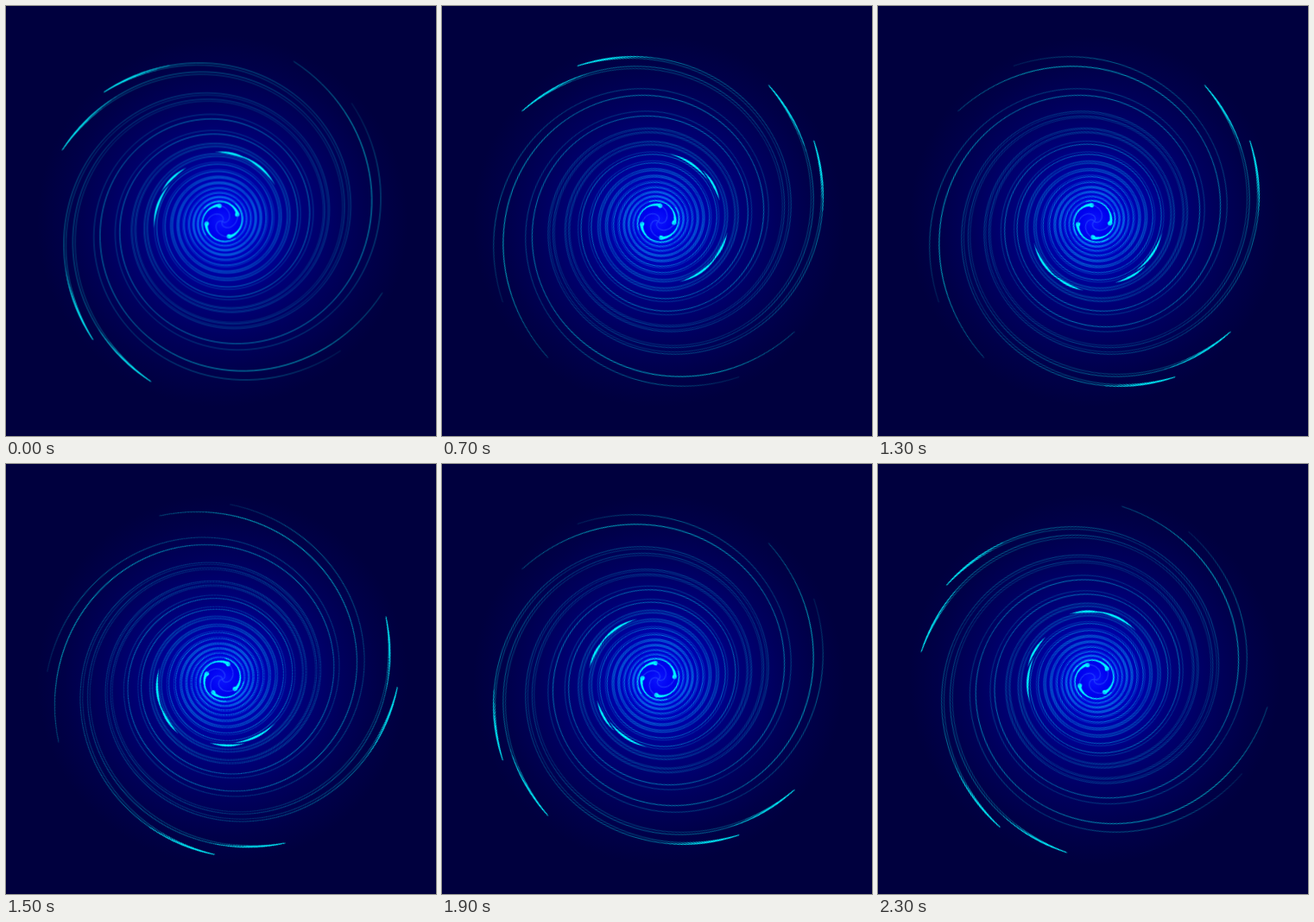
These frames come from a looping animation (498 by 498 pixels, 2.4 s). An HTML page:

```html
<!DOCTYPE html>
<html lang="en">
<head>
<meta charset="utf-8">
<title>Blue spiral</title>
<style>
  html, body { margin: 0; width: 100%; height: 100%; overflow: hidden; background: #00003e; }
  svg { display: block; width: 498px; height: 498px; }
  #spin { animation: spin 2.4s steps(24) infinite; }
  @keyframes spin { to { transform: rotate(360deg); } }
  path { fill: none; }
  .ribbon { fill: #00f6ff; }
</style>
</head>
<body>
<svg viewBox="0 0 498 498">
  <defs>
    <radialGradient id="glow" gradientUnits="userSpaceOnUse" cx="0" cy="0" r="215">
      <stop offset="0" stop-color="#0a14ff"/>
      <stop offset=".08" stop-color="#0000ee"/>
      <stop offset=".17" stop-color="#0000c4"/>
      <stop offset=".3" stop-color="#00009a"/>
      <stop offset=".42" stop-color="#00007a"/>
      <stop offset=".65" stop-color="#00005c"/>
      <stop offset=".85" stop-color="#000048"/>
      <stop offset="1" stop-color="#00003e"/>
    </radialGradient>
    <radialGradient id="bright" gradientUnits="userSpaceOnUse" cx="0" cy="0" r="205">
      <stop offset="0" stop-color="#14a0ff" stop-opacity=".8"/>
      <stop offset=".14" stop-color="#0cb4ff" stop-opacity=".75"/>
      <stop offset=".35" stop-color="#00a4e0" stop-opacity=".55"/>
      <stop offset=".7" stop-color="#00a8c8" stop-opacity=".55"/>
      <stop offset=".88" stop-color="#00c4d0" stop-opacity=".7"/>
      <stop offset="1" stop-color="#00f6ff"/>
    </radialGradient>
    <radialGradient id="fading" gradientUnits="userSpaceOnUse" cx="0" cy="0" r="205">
      <stop offset="0" stop-color="#14a0ff" stop-opacity=".8"/>
      <stop offset=".14" stop-color="#0cb4ff" stop-opacity=".75"/>
      <stop offset=".35" stop-color="#00b0e8" stop-opacity=".6"/>
      <stop offset=".7" stop-color="#00c0d8" stop-opacity=".65"/>
      <stop offset=".92" stop-color="#00e0e4" stop-opacity=".85"/>
      <stop offset="1" stop-color="#00d0d8" stop-opacity=".3"/>
    </radialGradient>
  </defs>
  <g transform="translate(250.5 249.5)">
    <circle r="215" fill="url(#glow)"/>
    <g id="spin"></g>
  </g>
</svg>
<script>
  const spin = document.getElementById('spin');
  const SCALE = 60, TURN = 0.0669 / 90, RIM = 203;

  function add(tag, attrs) {
    const el = document.createElementNS('http://www.w3.org/2000/svg', tag);
    for (const key in attrs) el.setAttribute(key, attrs[key]);
    spin.append(el);
  }

  // Radius after winding inward by d degrees from the given start radius.
  const radius = (d, from = RIM) => SCALE * Math.tan(Math.atan(from / SCALE) - TURN * d);

  // Strands share a tip and drift apart by up to `gap` degrees.
  const drift = (d, gap) => d + gap * (1 - Math.exp(-d / 30));

  function polar(r, deg) {
    const a = deg * Math.PI / 180;
    return (r * Math.cos(a)).toFixed(2) + ' ' + (r * Math.sin(a)).toFixed(2);
  }

  function strand(start, length, gap, stroke, width, opacity) {
    const points = [];
    for (let d = 0; d <= length; d += 3) points.push(polar(radius(drift(d, gap)), start + d));
    add('path', { d: 'M' + points.join('L'), stroke: `url(#${stroke})`, 'stroke-width': width, opacity });
  }

  // Filled band along the spiral; `thick` gives its width for u from 0 to 1.
  function ribbon(start, first, last, thick, from = RIM, gap = 0) {
    const outer = [], inner = [];
    for (let i = 0; i <= 30; i++) {
      const u = i / 30, d = first + (last - first) * u;
      const r = radius(drift(d, gap), from), half = thick(u) / 2;
      outer.push(polar(r + half, start + d));
      inner.unshift(polar(r - half, start + d));
    }
    add('path', { class: 'ribbon', d: 'M' + outer.concat(inner).join('L') + 'Z' });
  }

  const tipWidth = u => 3.6 * u ** 0.6 * (1 - u);
  const arcWidth = u => 2.5 * Math.sin(Math.PI * u) ** 1.3;
  const tailWidth = u => 0.7 + 3.2 * u ** 3;

  const innerEnds = [1301, 1302, 1318, 1316];

  innerEnds.forEach((length, k) => {
    const a = 114 + 90 * k, b = 137.5 + 90 * k;
    if (k < 2) {
      for (const [start, end] of [[a, length], [b, 1240]]) {
        strand(start, end, 0, 'bright', 0.8, 0.85);
        strand(start, end - 60, 8, 'bright', 0.7, 0.7);
        ribbon(start, 0, 26, tipWidth);
        ribbon(start, 0, 20, u => tipWidth(u) * 0.6, RIM, 8);
      }
    } else {
      strand(a, length, 0, 'fading', 1, 0.95);
      strand(b, 1240, 0, 'fading', 0.8, 0.6);
    }

    // Inner head with its tail, and a faint wisp running into the core.
    ribbon(a, length - 120, length, tailWidth);
    const r = radius(length), end = a + length;
    const [cx, cy] = polar(r - 0.6, end).split(' ');
    add('circle', { cx, cy, r: 2.5, fill: '#00f6ff' });
    const wisp = [];
    for (let i = 0; i <= 16; i++) wisp.push(polar(r * (1 - i / 16), end + i * 9));
    add('path', { d: 'M' + wisp.join('L'), stroke: '#2c5cff', 'stroke-width': 1.2, opacity: 0.55 });
  });

  // Highlights on the middle windings: start angle, sweep, start radius.
  for (const [start, sweep, from] of [[174, 42, 79.5], [205, 32, 78.5], [264, 30, 81], [284, 42, 79]])
    ribbon(start, 0, sweep, arcWidth, from);
</script>
</body>
</html>
```
